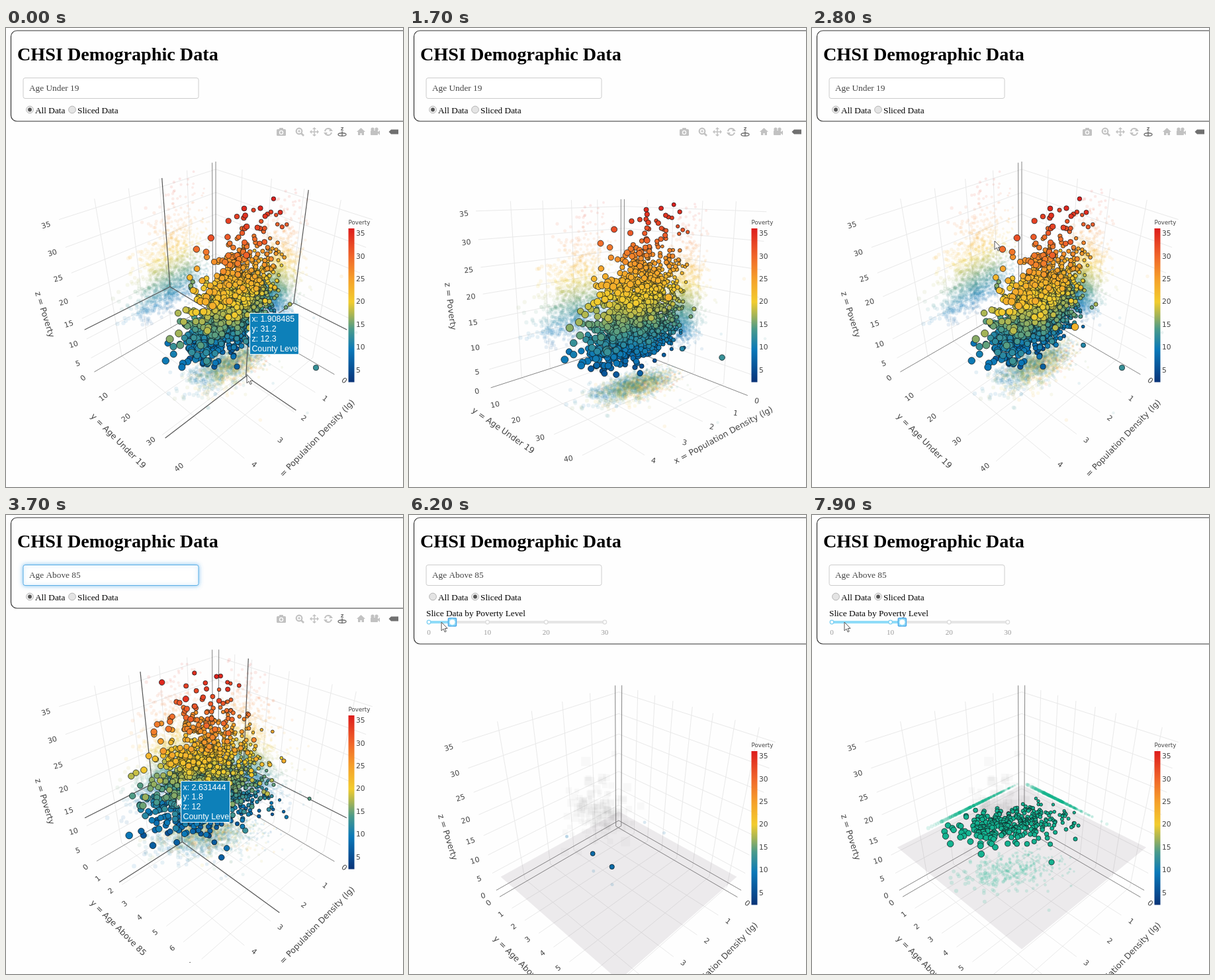
These frames come from a looping animation (600x694 px, 8 s). An HTML page with a canvas:

```html
<!DOCTYPE html>
<html>
<head>
<meta charset="utf-8">
<style>
html, body { margin: 0; width: 600px; height: 694px; overflow: hidden; background: #fefefe; }
canvas { display: block; }
</style>
</head>
<body>
<canvas id="stage" width="600" height="694"></canvas>
<script>
const ctx = document.getElementById('stage').getContext('2d');
const LOOP = 8000, TICK = 100, RAD = Math.PI / 180, TAU = Math.PI * 2;
const SANS = '"DejaVu Sans", sans-serif', SERIF = '"Liberation Serif", serif';
const ARIAL = '"Liberation Sans", sans-serif';

let seed = 7;
const rnd = () => (seed = (seed * 16807) % 2147483647) / 2147483647;
const gauss = () => Math.sqrt(-2 * Math.log(rnd())) * Math.cos(TAU * rnd());
const mix = (a, b, k) => a + (b - a) * k;
const clamp = v => Math.max(0, Math.min(1, v));
const ease = (t, a, b) => { const k = clamp((t - a) / (b - a)); return k * k * (3 - 2 * k); };

// colour scale: poverty level -> rgb
const SCALE = [[2.4, 10, 52, 120], [5, 8, 77, 146], [9.5, 10, 120, 184], [14, 74, 154, 138],
  [17, 163, 179, 87], [20, 242, 204, 46], [25, 245, 160, 42], [30, 240, 102, 42], [36.2, 221, 28, 28]];
function color(z) {
  let i = 1;
  while (i < SCALE.length - 1 && SCALE[i][0] < z) i++;
  const a = SCALE[i - 1], b = SCALE[i], k = clamp((z - a[0]) / (b[0] - a[0]));
  return `rgb(${[1, 2, 3].map(j => Math.round(mix(a[j], b[j], k)))})`;
}

function makeData(yOf) {
  const pts = [];
  while (pts.length < 1900) {
    const i = pts.length;
    const x = 1.7 + gauss() * (i % 30 ? 0.68 : 1.2);
    const mid = 15.5 - 2 * Math.max(0, x - 1.6) - 2.5 * Math.max(0, 1 - x);
    const z = Math.max(7, mid) * Math.exp(gauss() * 0.34);
    const y = yOf(x, z, i);
    if (x < 0 || x > 4.7 || z < 3.1 || z > 36 || y < 0.15) continue;
    pts.push({ v: [x, y, z], c: color(z) });
  }
  return pts;
}
const X_AXIS = { min: -0.15, max: 4.98, step: 1 };
const Z_ALL = { min: 1.1, max: 36.6, step: 5 }, Z_SLICE = { min: -1.33, max: 36.7, step: 5 };
const young = {
  name: 'Age Under 19', y: { min: 0, max: 48.2, step: 10 },
  pts: makeData((x, z, i) => 24.6 + 0.14 * (z - 15) + gauss() * (i % 40 ? 3 : 8)),
  hover: [1.908485, 31.2, 12.3]
};
const old = {
  name: 'Age Above 85', y: { min: -0.2, max: 7.72, step: 1 },
  pts: makeData((x, z, i) => 2.2 - 0.5 * (x - 1.7) - 0.03 * (z - 15) + gauss() * 0.7 +
    (i % 9 ? 0 : Math.abs(gauss()))),
  hover: [2.631444, 1.8, 12]
};
const smudge = Array.from({ length: 130 }, () =>
  [289 + gauss() * 21, 448 + gauss() * 26, 6 + rnd() * 9]);

let project, axes;
function setCamera(k, cy) {
  const a = (45 + 5 * k) * RAD, e = 35.264 * (1 - k) * RAD;
  const ca = Math.cos(a), sa = Math.sin(a), ce = Math.cos(e), se = Math.sin(e);
  project = f => {
    const x = f[0] - 0.5, y = f[1] - 0.5, z = f[2] - 0.5, h = x * ca + y * sa;
    const d = 2.165 - h * ce - z * se;
    return [317 + 637 * (y * ca - x * sa) / d, cy - 637 * (z * ce - h * se) / d, d];
  };
}
const frac = v => v.map((n, i) => (n - axes[i].min) / (axes[i].max - axes[i].min));
const put = (f, i, n) => { const g = f.slice(); g[i] = n; return g; };

function line(a, b, style, width = 1) {
  ctx.strokeStyle = style; ctx.lineWidth = width;
  ctx.beginPath(); ctx.moveTo(a[0], a[1]); ctx.lineTo(b[0], b[1]); ctx.stroke();
}
const seg = (a, b, style, w) => line(project(a), project(b), style, w);
function disc(x, y, r, fill, stroke, w = 1) {
  ctx.beginPath(); ctx.arc(x, y, r, 0, TAU);
  if (fill) { ctx.fillStyle = fill; ctx.fill(); }
  if (stroke) { ctx.strokeStyle = stroke; ctx.lineWidth = w; ctx.stroke(); }
}
function poly(pts, fill, stroke, w = 1) {
  ctx.beginPath();
  pts.forEach(p => ctx.lineTo(p[0], p[1]));
  ctx.closePath();
  if (fill) { ctx.fillStyle = fill; ctx.fill(); }
  if (stroke) { ctx.strokeStyle = stroke; ctx.lineWidth = w; ctx.stroke(); }
}
function box(x, y, w, h, r, fill, stroke, lw = 1) {
  ctx.beginPath(); ctx.roundRect(x, y, w, h, r);
  if (fill) { ctx.fillStyle = fill; ctx.fill(); }
  if (stroke) { ctx.strokeStyle = stroke; ctx.lineWidth = lw; ctx.stroke(); }
}
function text(s, x, y, font, fill, align = 'left') {
  ctx.font = font; ctx.fillStyle = fill; ctx.textAlign = align; ctx.textBaseline = 'alphabetic';
  ctx.fillText(s, x, y);
}
function tilted(s, x, y, deg, size) {
  ctx.save();
  ctx.translate(x, y); ctx.rotate(deg * RAD);
  text(s, 0, size * 0.36, `${size}px ${SANS}`, '#444', 'center');
  ctx.restore();
}

// label offset and tilt per axis, [default view, low view]
const TICK_POSE = [[[15, 9, 38], [13, 7, -10]], [[-17, 9, -38], [-24, 2, 8]], [[-20, 8, -17], [-17, 1, 0]]];
const TITLE_POSE = [[[466, 624, -46], [481, 609, -16]], [[170, 624, 45], [123, 597, 28]], [[59, 433, 72.5], [66, 412, 90]]];
const pose = (p, k) => p[0].map((n, i) => mix(n, p[1][i], k));

function drawAxes(name, k, dy) {
  const zero = [];
  axes.forEach((ax, i) => {
    for (let n = 0; n < ax.max; n += ax.step) {
      if (n < ax.min) continue;
      const f = (n - ax.min) / (ax.max - ax.min), base = put([0, 0, 0], i, f);
      for (let j = 0; j < 3; j++) if (j !== i) {
        if (n) seg(base, put(base, j, 1), '#e9e9e9');
        else zero.push([base, put(base, j, 1)]);
      }
      const p = project(put([[0, 1, 0], [1, 0, 0], [1, 0, 0]][i], i, f));
      const [ox, oy, deg] = pose(TICK_POSE[i], k);
      tilted(n, p[0] + ox, p[1] + oy, deg, 11);
    }
    const [x, y, deg] = pose(TITLE_POSE[i], k);
    const label = ['x = Population Density (lg)', 'y = ' + name, 'z = Poverty'][i];
    tilted(label, x, y + dy, deg > 88 ? deg - 180 : deg, 12.5);
  });
  zero.forEach(z => seg(z[0], z[1], '#858585'));
}

function drawPoints(list, shadow) {
  const items = list.map(p => ({ f: frac(p.v), c: p.c, r: 2.5 + 0.68 * p.v[0] }));
  ctx.globalAlpha = shadow;
  for (const p of items) for (let i = 0; i < 3; i++) {
    const q = project(put(p.f, i, 0));
    disc(q[0], q[1], p.r * 0.62, p.c);
  }
  ctx.globalAlpha = 1;
  return () => {
    items.forEach(p => p.q = project(p.f));
    items.sort((a, b) => b.q[2] - a.q[2]);
    for (const p of items) disc(p.q[0], p.q[1], p.r * 2.2 / p.q[2], p.c, 'rgba(15,25,30,.85)', 0.9);
  };
}

function drawSpikes(v) {
  const f = frac(v);
  for (let i = 0; i < 3; i++) {
    const wall = put(f, i, 0);
    seg(f, wall, '#555', 1.2);
    for (let j = 0; j < 3; j++) if (j !== i) seg(wall, put(wall, j, 1), '#555', 1.2);
  }
}
function drawTip(v) {
  const [x, y] = project(frac(v));
  box(x + 2, y - 31, 74, 62, 0, '#0d80b9', '#fff');
  poly([[x - 3, y], [x + 3, y - 6], [x + 3, y + 6]], '#fff');
  ['x: ' + v[0], 'y: ' + v[1], 'z: ' + v[2], 'County Level'].forEach((s, i) =>
    text(s, x + 5, y - 18 + i * 14.7, `12.4px ${ARIAL}`, '#fff'));
}

function drawColorBar(dy) {
  const g = ctx.createLinearGradient(0, 535 + dy, 0, 303 + dy);
  SCALE.forEach(s => g.addColorStop(clamp((s[0] - 2.4) / 33.8), color(s[0])));
  ctx.fillStyle = g; ctx.fillRect(517.5, 303 + dy, 9, 232.5);
  text('Poverty', 517.5, 297 + dy, `8.7px ${SANS}`, '#444');
  for (let n = 5; n <= 35; n += 5)
    text(n, 529, 520.5 - (n - 5) * 6.87 + dy, `10.8px ${SANS}`, '#444');
}

function drawTools() {
  const g = '#c2c2c2', d = '#707070', w = '#fefefe';
  box(409, 153, 14, 10, 1.5, g); box(413, 151, 6, 4, 1, g);
  disc(416, 158, 3.2, w); disc(416, 158, 1.9, g);
  disc(443, 156, 4.3, null, g, 2.2); line([446, 159], [450, 163], g, 2.6);
  line([441, 156], [445, 156], g, 1.2); line([443, 154], [443, 158], g, 1.2);
  line([460, 157], [472, 157], g, 1.5); line([466, 151], [466, 163], g, 1.5);
  for (let i = 0; i < 4; i++) {
    const c = Math.cos(i * TAU / 4), s = Math.sin(i * TAU / 4);
    const at = (a, b) => [466 + a * c - b * s, 157 + a * s + b * c];
    poly([at(7, 0), at(4, 3), at(4, -3)], g);
  }
  for (const s of [1, -1]) {
    ctx.beginPath(); ctx.arc(487, 157, 5, s > 0 ? 0.2 : 3.3, s > 0 ? 2.4 : 5.5);
    ctx.strokeStyle = g; ctx.lineWidth = 2.2; ctx.stroke();
    poly([[487 + s * 7, 157 - s], [487 + s, 157 - s], [487 + s * 4, 157 - s * 5]], g);
  }
  text('z', 508, 155, `bold 8px ${SANS}`, d, 'center');
  line([508, 156], [508, 163], d, 1.5);
  ctx.beginPath(); ctx.ellipse(508, 161, 6, 2.2, 0, 0, TAU);
  ctx.strokeStyle = d; ctx.lineWidth = 1.4; ctx.stroke();
  poly([[530, 157], [536.5, 151], [543, 157]], g); box(532, 157, 9, 5, 0, g);
  box(535.5, 159, 2, 3, 0, w);
  disc(554, 153, 2.6, g); disc(560, 153, 2.6, g); box(551, 155, 11, 7, 1, g);
  poly([[561, 158], [565, 155], [565, 162]], g);
  poly([[578.5, 157], [582, 153.5], [593, 153.5], [593, 160.5], [582, 160.5]], d);
}

function radio(x, on) {
  disc(x, 123.5, 5.4, on ? '#eee' : '#e4e4e4', '#b5b5b5');
  if (on) disc(x, 123.5, 2.9, '#555');
}
function drawPanel(name, focus, sliced, level, keyed) {
  box(7.5, 4, 640, sliced ? 191 : 137, 9, '#fefefe', '#333', 1.2);
  text('CHSI Demographic Data', 17, 49, `bold 28.2px ${SERIF}`, '#000');
  if (focus) { ctx.shadowColor = 'rgba(80,170,235,.7)'; ctx.shadowBlur = 6; }
  box(26, 75.5, 265, 31, 3, '#fff', focus ? '#5aaee6' : '#ccc');
  ctx.shadowBlur = 0;
  const small = `13.3px ${SERIF}`;
  text(name, 35, 95, small, '#444');
  radio(36, !sliced); radio(100, sliced);
  text('All Data', 44, 129, small, '#000');
  text('Sliced Data', 108, 129, small, '#000');
  if (!sliced) return;
  text('Slice Data by Poverty Level', 26, 153, small, '#000');
  const x = 30 + level * 8.86;
  box(28, 160, 270, 4, 2, '#e6e6e6');
  box(28, 160, x - 28, 4, 2, '#8fdcf8');
  for (let n = 0; n <= 30; n += 10) {
    const tx = 30 + n * 8.86;
    disc(tx, 162, 2.8, '#fff', n <= level ? '#7fd0f2' : '#dcdcdc', 1.3);
    text(n, tx, 181, `11px ${SERIF}`, '#999', 'center');
  }
  if (keyed) box(x - 6, 156, 12, 12, 1, '#9bdcf8', '#4aa8e8', 1.5);
  disc(x, 162, 4.8, '#fff', '#8fdcf8', 1.8);
}

function drawCursor(x, y) {
  poly([[0, 0], [0, 13], [3, 10.2], [5.2, 15], [7.2, 14], [5.1, 9.6], [9, 9.4]]
    .map(p => [x + p[0], y + p[1]]), '#fff', '#555');
}
const PATH = [[0, 364, 524], [1000, 402, 552], [2700, 402, 552], [2900, 150, 92], [3200, 150, 92],
  [3500, 258, 428], [3900, 258, 428], [4250, 99, 124], [4500, 99, 124], [4750, 30, 162], [5000, 49, 162], [LOOP, 49, 162]];
function cursorAt(t) {
  const i = PATH.findIndex(p => p[0] > t), a = PATH[i - 1], b = PATH[i], k = ease(t, a[0], b[0]);
  return [mix(a[1], b[1], k), mix(a[2], b[2], k)];
}
function levelAt(t) {
  if (t < 5000) return Math.round(2 * ease(t, 4750, 5000));
  if (t < 5400) return 2;
  return t < 7100 ? 2 + Math.floor((t - 5400) / 283.3) : 8 + Math.floor((t - 7100) / 200);
}

function drawSlice(data, level) {
  ctx.fillStyle = 'rgba(90,90,100,.035)';
  smudge.forEach(([x, y, s]) => ctx.fillRect(x - s / 2, y - s / 2, s, s));
  const h = frac([0, 0, level])[2];
  const sheet = [[0.03, 0.03], [0.97, 0.03], [0.97, 0.97], [0.03, 0.97]].map(c => project([...c, h]));
  poly(sheet, 'rgba(105,95,110,.12)');
  const k = clamp((level - 8) / 4);
  const c = `rgb(${[mix(10, 20, k), mix(107, 179, k), mix(168, 144, k)].map(Math.round)})`;
  const near = data.pts.filter(p => Math.abs(p.v[2] - level) <= 1)
    .map(p => ({ v: [p.v[0], p.v[1], level], c }));
  drawPoints(near, 0.15)();
}

function draw(t) {
  const data = t < 3300 ? young : old, sliced = t >= 4300, level = levelAt(t), dy = sliced ? 54 : 0;
  const k = ease(t, 1200, 2100) * (1 - ease(t, 2200, 2800));
  const hover = t < 500 || (t >= 3500 && t < 3900);
  axes = [X_AXIS, data.y, sliced ? Z_SLICE : Z_ALL];
  setCamera(k, 414 + dy);
  ctx.fillStyle = '#fefefe'; ctx.fillRect(0, 0, 600, 694);
  ctx.save();
  ctx.beginPath(); ctx.rect(0, 143, 600, 534 + dy); ctx.clip();
  drawAxes(data.name, k, dy);
  if (sliced) drawSlice(data, level);
  else {
    const cloud = drawPoints(data.pts, 0.1);
    if (hover) drawSpikes(data.hover);
    cloud();
  }
  drawColorBar(dy);
  ctx.restore();
  if (!sliced) drawTools();
  drawPanel(data.name, t >= 2900 && t < 4300, sliced, level, t >= 5400);
  if (t < 1200 || t >= 2700) drawCursor(...cursorAt(t));
  if (hover) drawTip(data.hover);
}

let last = -1;
function loop(now) {
  const tick = Math.floor((now % LOOP) / TICK);
  if (tick !== last) draw((last = tick) * TICK);
  requestAnimationFrame(loop);
}
draw(0);
requestAnimationFrame(loop);
</script>
</body>
</html>
```
